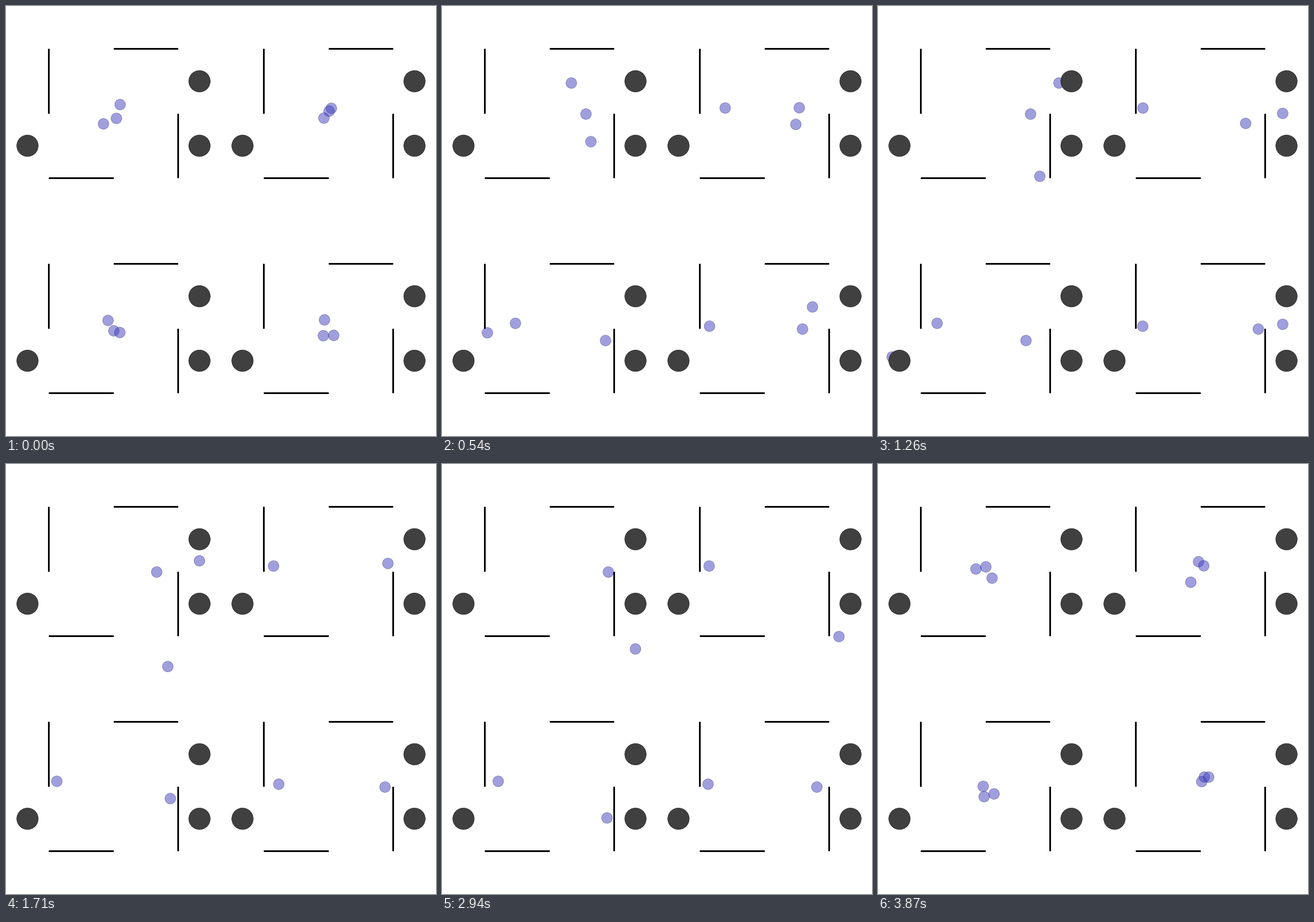
These frames come from a looping animation (748 px wide and 748 px high, 3.9 s). A matplotlib script:

```python
import numpy as np
import matplotlib.pyplot as plt
from matplotlib.animation import FuncAnimation
from matplotlib.patches import Circle

SIZE, DPI = 748, 100
PANEL = SIZE / 2
FRAMES, INTERVAL = 130, 30
STEP = PANEL / 100      # distance an agent covers per frame
WARMUP = 14             # steps taken between the first picture and the next
GATHER = 18             # frame at which the runners set off

rng = np.random.default_rng(5)


def runner(*corners):
    """Heads for the second corner, then follows the rest at full speed."""
    x, y = np.array(corners).T
    legs = np.hypot(np.diff(x[1:]), np.diff(y[1:]))
    times = GATHER + np.concatenate([[0], np.cumsum(legs)]) / STEP
    times = np.concatenate([[-WARMUP], times])
    return lambda t: (np.interp(t, times, x), np.interp(t, times, y))


def guard(start, post, reach, period, peak, arrive=32, leave=FRAMES):
    """Walks to a post, paces sideways around it, may leave downwards."""
    def at(t):
        phase = 2 * np.pi * (np.clip(t, arrive, leave) - peak) / period
        goal = post[0] + reach * np.cos(phase)
        walked = min(1, (t + WARMUP) / (arrive + WARMUP))
        limit = STEP * (t + WARMUP)
        x = start[0] + walked * (goal - start[0])
        y = start[1] + np.clip(post[1] - start[1], -limit, limit)
        return x, y + STEP * max(0, t - leave)
    return at


PANELS = [
    [runner((198.5, 171.5), (225, 134), (336.5, 134), (336.5, 404)),
     guard((192, 195.5), (276, 188), 15, period=80, peak=92),
     runner((169.5, 205), (259, 236), (285, 236), (281.5, 236), (281.5, 404))],
    [runner((192, 178), (247.5, 177), (327, 177), (330, 187), (330, 404)),
     runner((188, 183), (241.5, 206), (241.5, 238), (265.5, 238),
            (265.5, 173), (316.5, 173), (316.5, 404)),
     guard((179, 195), (94.5, 177.5), 8, period=64, peak=77)],
    [runner((177.5, 173), (79, 194.5), (71.6, 236.5), (-30, 236.5)),
     guard((187.5, 191), (95, 178), 9, period=50, peak=38),
     guard((198, 194), (270, 208), 17, period=34, peak=55,
           arrive=GATHER, leave=89)],
    [runner((180, 172), (270.5, 149.5), (330, 149.5), (330, 404)),
     guard((178, 199.5), (93.5, 183), 7, period=30, peak=57, arrive=GATHER),
     guard((196, 199), (277.5, 188), 12, period=66, peak=48)],
]
RESETS = PANEL * rng.uniform(0.45, 0.55, (4, 3, 2))

WALLS = [((0.2, 0.2), (0.2, 0.5)), ((0.5, 0.8), (0.2, 0.2)),
         ((0.8, 0.8), (0.5, 0.8)), ((0.2, 0.5), (0.8, 0.8))]
PILLARS = [(0.1, 0.65), (0.9, 0.35), (0.9, 0.65)]

fig = plt.figure(figsize=(SIZE / DPI, SIZE / DPI), dpi=DPI, facecolor="white")


def disc(ax, center, radius, fill, edge, z):
    return ax.add_patch(Circle(center, radius * PANEL, fc=fill, ec=edge,
                               lw=0.5, zorder=z))


def make_panel(i):
    ax = fig.add_axes([i % 2 / 2, 0.5 - i // 2 / 2, 0.5, 0.5])
    ax.set(xlim=(0, PANEL), ylim=(PANEL, 0))
    ax.axis("off")
    for wall in WALLS:
        xs, ys = np.floor(np.multiply(wall, PANEL))
        ax.plot(xs, ys, color="black", lw=3 * 72 / DPI,
                solid_capstyle="butt", zorder=3)
    for x, y in PILLARS:
        disc(ax, (x * PANEL, y * PANEL), 0.05, "#404040", (0, 0, 0, 0.75), 4)
    return [disc(ax, (0, 0), 0.025, (0.25, 0.25, 0.75, 0.5),
                 (0.1, 0.1, 0.4, 0.5), 2) for _ in range(3)]


dots = [make_panel(i) for i in range(4)]


def update(frame):
    t = frame if frame else -WARMUP
    for i, paths in enumerate(PANELS):
        for k, path in enumerate(paths):
            done = frame == FRAMES - 1
            dots[i][k].center = RESETS[i, k] if done else path(t)
    return sum(dots, [])


anim = FuncAnimation(fig, update, frames=FRAMES, interval=INTERVAL,
                     repeat=True, repeat_delay=0, blit=False)
plt.show()
```
